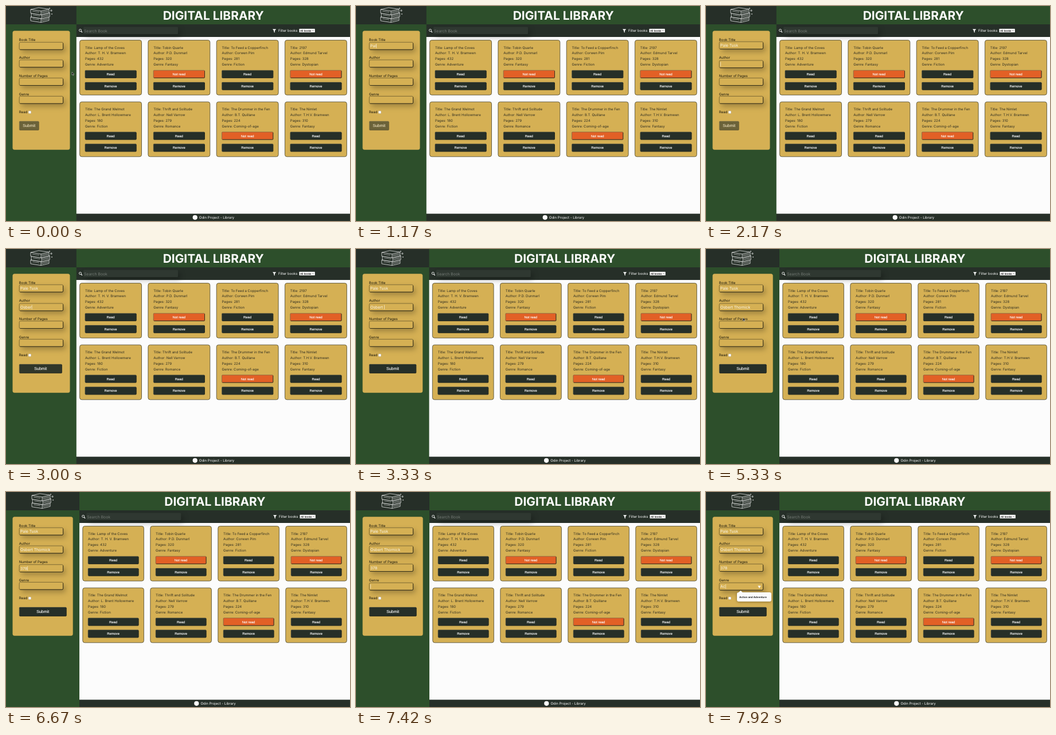
Recreate the animation shown at these times as an HTML page. Size 600 by 375 pixels, loop 8 s.

```html
<!DOCTYPE html>
<html lang="en">
<head>
<meta charset="utf-8">
<title>Digital Library</title>
<style>
  html, body { margin: 0; width: 100%; height: 100%; overflow: hidden; background: #fcfcfc; }
  svg { display: block; width: 100vw; height: 100vh; }
  text { font-family: Inter, sans-serif; white-space: pre; text-rendering: geometricPrecision; }
  .ui { font-family: "Liberation Sans", Arial, sans-serif; }
  .mid { text-anchor: middle; }
  .cast { filter: drop-shadow(4px 5px 5px rgba(0, 0, 0, .26)); }
  .soft { filter: drop-shadow(0 1px 2px rgba(0, 0, 0, .35)); }
</style>
</head>
<body>
<svg id="stage" viewBox="0 0 600 375"></svg>
<script>
const LOOP = 8000;
const GREEN = '#2d4f2b', DARK = '#262f28', GOLD = '#d5b054', ORANGE = '#e26026', CREAM = '#fdf9ee';
const stage = document.getElementById('stage');

function add(parent, tag, attrs = {}) {
  const node = document.createElementNS('http://www.w3.org/2000/svg', tag);
  set(node, attrs);
  return parent.appendChild(node);
}
function set(node, attrs) {
  for (const key in attrs) node.setAttribute(key, attrs[key]);
}
const group = parent => add(parent, 'g');
const rect = (parent, x, y, width, height, fill, more) =>
  add(parent, 'rect', { x, y, width, height, fill, ...more });
const path = (parent, d, more) => add(parent, 'path', { d, fill: 'none', ...more });
const shift = (node, x, y = 0) => set(node, { transform: `translate(${x} ${y})` });
const show = (node, on) => set(node, { visibility: on ? 'visible' : 'hidden' });

// y is the middle of the capitals
function label(parent, x, y, string, size, fill, more) {
  const node = add(parent, 'text', { x, y: y + size * 0.36, 'font-size': size, fill, ...more });
  node.textContent = string;
  return node;
}

function button(parent, x, y, width, height, string, size, fill) {
  const box = rect(parent, x, y, width, height, fill, { rx: 1.2, stroke: '#4b5048', 'stroke-width': 0.5 });
  const edge = path(parent, '', { stroke: '#111611', 'stroke-width': 0.7 });
  const caption = label(parent, 0, y + height / 2, string, size, '#fff',
    { class: 'ui mid', stroke: '#fff', 'stroke-width': 0.12 });
  return w => {
    set(box, { width: w });
    set(edge, { d: `M${x + 1} ${y + height}H${x + w - 1}q1 0 1 -1V${y + 1}` });
    set(caption, { x: x + w / 2 });
  };
}

// page frame
rect(stage, 0, 0, 600, 375, '#fcfcfc');
rect(stage, 0, 0, 600, 32, GREEN);
rect(stage, 0, 32, 600, 22, DARK);
rect(stage, 0, 362.3, 600, 12.7, DARK);

const heading = group(stage);
label(heading, 361.8, 16, 'DIGITAL LIBRARY', 20.9, '#fff', { class: 'mid', 'font-weight': 700 });

const footer = group(stage);
add(footer, 'circle', { cx: 329.7, cy: 368.8, r: 4.1, fill: '#fff' });
label(footer, 336.8, 368.8, 'Odin Project - Library', 6.05, '#fff');

const search = group(stage);
rect(search, 135, 36.5, 165, 12.5, '#2f3831', { rx: 1.5, class: 'cast' });
add(search, 'circle', { cx: 129.5, cy: 42.4, r: 2, fill: 'none', stroke: '#fff', 'stroke-width': 0.9 });
path(search, 'M131 44l2 2', { stroke: '#fff', 'stroke-width': 1.1 });
label(search, 136, 43.2, 'Search Book', 6.8, '#737a74');

const filter = group(stage);
path(filter, 'M465 40.3h6.2l-2.4 3v3.2l-1.5-1.1v-2.1z', { fill: '#fff' });
label(filter, 475, 43.1, 'Filter books', 6.05, '#fff');
rect(filter, 511.5, 39.7, 27.3, 6.4, '#fff', { rx: 0.6 });
label(filter, 513, 43, 'All books', 4.8, '#111', { class: 'ui', stroke: '#111', 'stroke-width': 0.1 });
path(filter, 'M534 42.2l1.3 1.4 1.3-1.4', { stroke: '#222', 'stroke-width': 0.6 });

// library cards
const books = [
  ['Lamp of the Coves', 'T. H. V. Bramwen', 432, 'Adventure', true],
  ['Tobin Quarle', 'P.D. Dunmarl', 320, 'Fantasy', false],
  ['To Feed a Copperfinch', 'Corwen Pim', 281, 'Fiction', true],
  ['2197', 'Edmund Tarvel', 328, 'Dystopian', false],
  ['The Grand Welmot', 'L. Brent Hollowmere', 180, 'Fiction', true],
  ['Thrift and Solitude', 'Nell Varrow', 279, 'Romance', true],
  ['The Drummer in the Fen', 'B.T. Quillane', 224, 'Coming-of-age', false],
  ['The Nimlet', 'T.H.V. Bramwen', 310, 'Fantasy', true]
];
const cards = books.map(([title, author, pages, genre, read], i) => {
  const card = group(stage);
  const box = rect(card, 0, 0, 108, 95.6, GOLD, { rx: 3.5, stroke: '#3d3a26', 'stroke-width': 0.75 });
  [`Title: ${title}`, `Author: ${author}`, `Pages: ${pages}`, `Genre: ${genre}`]
    .forEach((line, n) => label(card, 9.3, 12.8 + n * 9.8, line, 6, '#2f2e22'));
  const status = button(card, 9.3, 52.6, 90, 13.2, read ? 'Read' : 'Not read', 5.9, read ? DARK : ORANGE);
  const remove = button(card, 9.3, 73.4, 90, 13.2, 'Remove', 5.9, DARK);
  return grow => {
    const left = 128.6 + grow, gap = 11.4;
    const width = (594.4 - left - 3 * gap) / 4;
    shift(card, left + (i % 4) * (width + gap), 59.6 + Math.floor(i / 4) * 107.6);
    set(box, { width });
    status(width - 18.6);
    remove(width - 18.6);
  };
});

// sidebar
const side = rect(stage, 0, 32, 123, 343, GREEN);
const sideTop = rect(stage, 0, 0, 123, 32, DARK);
const emblem = group(stage);
const ink = { stroke: '#fff', 'stroke-width': 0.7, 'stroke-linejoin': 'round' };
[19.2, 12.6, 6].forEach((y, i) => {
  const x = 43 + (i % 2) * 1.2;
  path(emblem, `M${x} ${y}l14 -3.2 18 2.6v6.6l-14 3.4 -18 -2.8z`, { ...ink, fill: DARK });
  path(emblem, `M${x} ${y}l18 2.8 14 -3.4M${x + 18} ${y + 2.8}v6.6`, ink);
  path(emblem, `M${x + 19} ${y + 4.6}l12 -2.8M${x + 19} ${y + 6.6}l12 -2.8M${x + 3} ${y + 3}l12 1.8`,
    { ...ink, 'stroke-width': 0.5 });
});
path(emblem, 'M79 6v4M77 8h4M80 13v2M79 14h2M76 3v2M75 4h2', { ...ink, 'stroke-width': 0.6 });

const panel = rect(stage, 11.5, 43.2, 100, 207.6, GOLD, { rx: 3.5 });

// typing starts at `first`, one key each `step`; focus lasts from `on` to `off`
const fields = [
  { name: 'Book Title', top: 62.3, value: 'Pale Tusk', first: 950, step: 110, on: -600, off: 2050 },
  { name: 'Author', top: 94, value: 'Osbert Thornick', first: 2440, step: 135, on: 2050, off: 5500 },
  { name: 'Number of Pages', top: 125.7, value: '378', first: 5950, step: 230, on: 5500, off: 6950 },
  { name: 'Genre', top: 157.4, value: 'Ac', first: 7580, step: 250, on: 6950, off: LOOP }
];
for (const field of fields) {
  const box = field.box = group(stage);
  rect(box, 23.2, 0, 76.4, 12.8, GOLD, { rx: 2, class: 'cast' });
  rect(box, 23.2, 0, 76.4, 12.8, 'none', { rx: 2, stroke: '#4a4223', 'stroke-width': 0.6 });
  path(box, 'M24.5 12.8H97.8q1.8 0 1.8 -1.8V1.5', { stroke: '#15150d', 'stroke-width': 0.7 });
  field.text = label(box, 25, 6.4, '', 6.8, CREAM);
  field.caret = rect(box, 25, 2.6, 0.6, 7.6, CREAM);
}
for (const { name, top } of fields) label(stage, 22.8, top - 3.8, name, 6.05, '#14140d');
label(stage, 22.8, 185.2, 'Read', 6.05, '#14140d');
rect(stage, 39.2, 183, 4.5, 4.5, '#fff', { rx: 0.8, stroke: '#999', 'stroke-width': 0.4 });

const submit = group(stage);
const sizeSubmit = button(submit, 23.2, 201, 34, 15.4, 'Submit', 7.1, DARK);

const hint = group(stage);
path(hint, 'M90.3 163.6h5.6l-2.8 4.4z', { fill: CREAM });
path(hint, 'M57 175l3.4-3 3.4 3H111q3 0 3 3v10q0 3-3 3H57q-3 0-3-3v-10q0-3 3-3z', { fill: '#fbfbfb', class: 'soft' });
label(hint, 58, 183, 'Action and Adventure', 4.5, '#222', { 'font-weight': 700 });

const pointer = path(stage, 'M0 0v5.4l1.3-1.2.9 2 .9-.4-.9-1.9h1.7z',
  { fill: '#111', stroke: '#fff', 'stroke-width': 0.4 });
const trips = [
  [[0, 115, 115], [90, 115, 115], [700, 62, 69], [950, 62, 69]],
  [[4950, 62, 72], [5330, 64.5, 120], [5500, 63, 131], [5950, 63, 131]]
];

function place(trip, t) {
  const i = trip.findIndex((stop, n) => n && t < stop[0]);
  const [t0, x0, y0] = trip[i - 1], [t1, x1, y1] = trip[i];
  const p = (t - t0) / (t1 - t0);
  return [x0 + (x1 - x0) * p, y0 + (y1 - y0) * p];
}

function drawField(field, t) {
  const { value, first, step, on, off, top } = field;
  const count = Math.max(0, Math.min(value.length, Math.floor((t - first) / step) + 1));
  const focused = t >= on && t < off;
  const lastKey = count ? first + (count - 1) * step : on;
  shift(field.box, 0, top + (focused ? 1 : 0));
  field.text.textContent = value.slice(0, count);
  set(field.caret, { x: 25.3 + (count ? field.text.getComputedTextLength() : 0) });
  show(field.caret, focused && (t - lastKey) % 1060 < 530);
}

function draw(t) {
  const p = Math.max(0, Math.min(1, (t - 2470) / 1000));
  const eased = 1 - Math.pow(1 - p, 2.4);
  const submitWidth = 34 + 48 * eased;
  const grow = Math.max(0, submitWidth - 76.8);

  sizeSubmit(submitWidth);
  set(submit, { opacity: 0.6 + 0.4 * eased });
  set(side, { width: 122.8 + grow });
  set(sideTop, { width: 122.8 + grow });
  set(panel, { width: 100 + grow });
  shift(emblem, grow * 0.4);
  shift(heading, grow / 2);
  shift(footer, grow / 2);
  shift(search, grow);
  shift(filter, grow / 5);
  cards.forEach(resize => resize(grow));
  fields.forEach(field => drawField(field, t));
  show(hint, t >= 7580);

  const trip = trips.find(stops => t >= stops[0][0] && t < stops.at(-1)[0]);
  show(pointer, trip);
  if (trip) shift(pointer, ...place(trip, t));
}

const start = performance.now();
function tick() {
  draw((performance.now() - start) % LOOP);
  requestAnimationFrame(tick);
}
tick();
</script>
</body>
</html>
```
